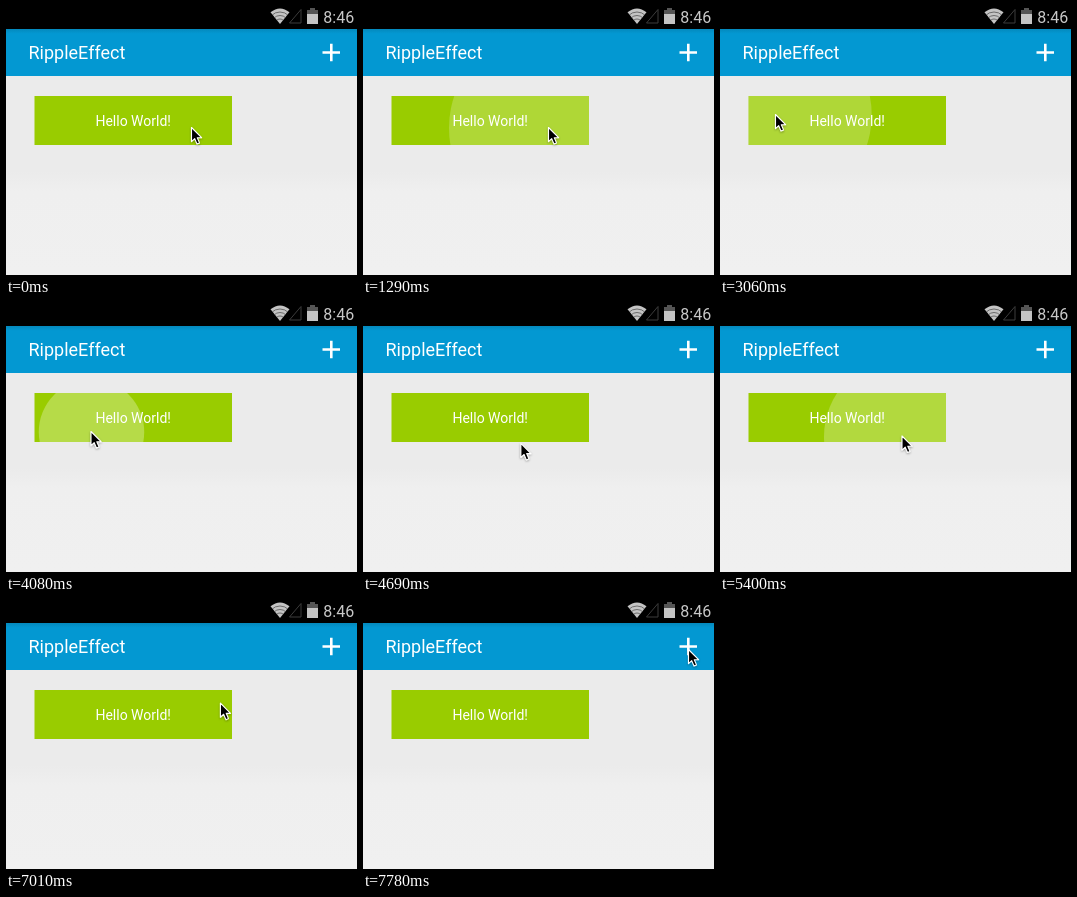
Animation, 351 px wide and 269 px high, one loop 8000 ms. Source, as an HTML page:

```html
<!DOCTYPE html>
<html lang="en">
<head>
<meta charset="utf-8">
<title>Ripple button</title>
<style>
  html, body { margin: 0; width: 100%; height: 100%; overflow: hidden; background: #eee; }
  svg { display: block; width: 100vw; height: 100vh; }
  text { font-family: Roboto, sans-serif; fill: #fff; }
</style>
</head>
<body>
<svg viewBox="0 0 351 269">
  <defs>
    <linearGradient id="page" x1="0" y1="70" x2="0" y2="269" gradientUnits="userSpaceOnUse">
      <stop offset="0" stop-color="#ebebeb"/>
      <stop offset=".48" stop-color="#ebebeb"/>
      <stop offset=".58" stop-color="#efefef"/>
      <stop offset="1" stop-color="#f0f0f0"/>
    </linearGradient>
    <linearGradient id="bar" x1="0" y1="0" x2="0" y2="1">
      <stop offset="0" stop-color="#0489bd"/>
      <stop offset=".1" stop-color="#0398d2"/>
      <stop offset="1" stop-color="#0398d2"/>
    </linearGradient>
    <clipPath id="button"><rect x="28.5" y="90" width="197.5" height="49"/></clipPath>
    <clipPath id="fan"><path d="M274 18 L264.5 6.3 Q274 -1.5 283.5 6.3 Z"/></clipPath>
    <filter id="shadow" x="-50%" y="-50%" width="200%" height="200%">
      <feDropShadow dx="0" dy="1" stdDeviation=".8" flood-opacity=".35"/>
    </filter>
  </defs>

  <rect width="351" height="269" fill="url(#page)"/>
  <rect width="351" height="23" fill="#000"/>
  <rect y="23" width="351" height="47" fill="url(#bar)"/>

  <!-- Status icons -->
  <g clip-path="url(#fan)">
    <rect x="264" y="1" width="20" height="18" fill="#c4c4c4"/>
    <g fill="none" stroke="#555" stroke-width=".8">
      <circle cx="274" cy="18" r="5"/>
      <circle cx="274" cy="18" r="8.5"/>
      <circle cx="274" cy="18" r="12"/>
    </g>
  </g>
  <path d="M283.5 17 L295 3.5 V17 Z" fill="none" stroke="#3c3c3c"/>
  <path d="M301 4 H304 V2 H309 V4 H312 V9 H301 Z" fill="#555"/>
  <rect x="301" y="8" width="11" height="10" fill="#c4c4c4"/>
  <text x="317.3" y="17" font-size="16" style="fill:#c8c8c8">8:46</text>

  <text x="22.5" y="53" font-size="18">RippleEffect</text>
  <path d="M316.5 46.5 H334 M325.3 37.8 V55.2" stroke="#fff" stroke-width="2.6"/>

  <g clip-path="url(#button)">
    <rect x="28" y="90" width="198" height="49" fill="#9c0"/>
    <circle id="ripple" fill="#fff"/>
  </g>
  <text x="127.2" y="119.5" font-size="14" text-anchor="middle">Hello World!</text>

  <path id="cursor" filter="url(#shadow)" stroke="#fff" stroke-width="1.1" stroke-linejoin="round"
    d="M.5 .5 V14.6 L3.7 11.6 L6 17 L8.5 15.9 L6.3 10.7 H10.6 Z"/>
</svg>
<script>
const LOOP = 8000, RIPPLE = 550, MAX_RADIUS = 118;
const smooth = u => u * u * (3 - 2 * u);
const quartOut = u => 1 - (1 - u) ** 4;

// Cursor travel: time span, start, control and end of a quadratic curve
const moves = [
  { from: 1890, to: 2460, path: [[185, 121], [120, 144], [55, 108]], ease: smooth },
  { from: 3420, to: 3710, path: [[55, 108], [68, 124], [84.5, 128]], ease: smooth },
  { from: 4320, to: 4870, path: [[84.5, 128], [133, 153], [181.5, 132.5]], ease: smooth },
  { from: 5750, to: 6160, path: [[181.5, 132.5], [183, 112], [174, 98.5]], ease: smooth },
  { from: 6950, to: 7780, path: [[174, 98.5], [250, 118], [325, 49]], ease: quartOut }
];
const taps = [1070, 2850, 3970, 5230, 6430];

const cursor = document.getElementById('cursor');
const ripple = document.getElementById('ripple');

function cursorAt(t) {
  const move = moves.findLast(m => t >= m.from) || moves[0];
  const u = Math.max(0, Math.min(1, (t - move.from) / (move.to - move.from)));
  const p = move.ease(u), q = 1 - p, [a, b, c] = move.path;
  return [0, 1].map(i => q * q * a[i] + 2 * p * q * b[i] + p * p * c[i]);
}

function draw() {
  const t = performance.now() % LOOP;
  cursor.setAttribute('transform', `translate(${cursorAt(t)})`);

  const tap = taps.findLast(start => t >= start);
  const age = t - tap;
  const active = age < RIPPLE;
  ripple.setAttribute('opacity', active ? 0.353 * (1 - age / RIPPLE) : 0);
  if (active) {
    const [x, y] = cursorAt(tap);
    ripple.setAttribute('cx', x + 1);
    ripple.setAttribute('cy', y + 1);
    ripple.setAttribute('r', Math.min(MAX_RADIUS, 5 + 0.43 * age));
  }
  requestAnimationFrame(draw);
}
draw();
</script>
</body>
</html>
```
